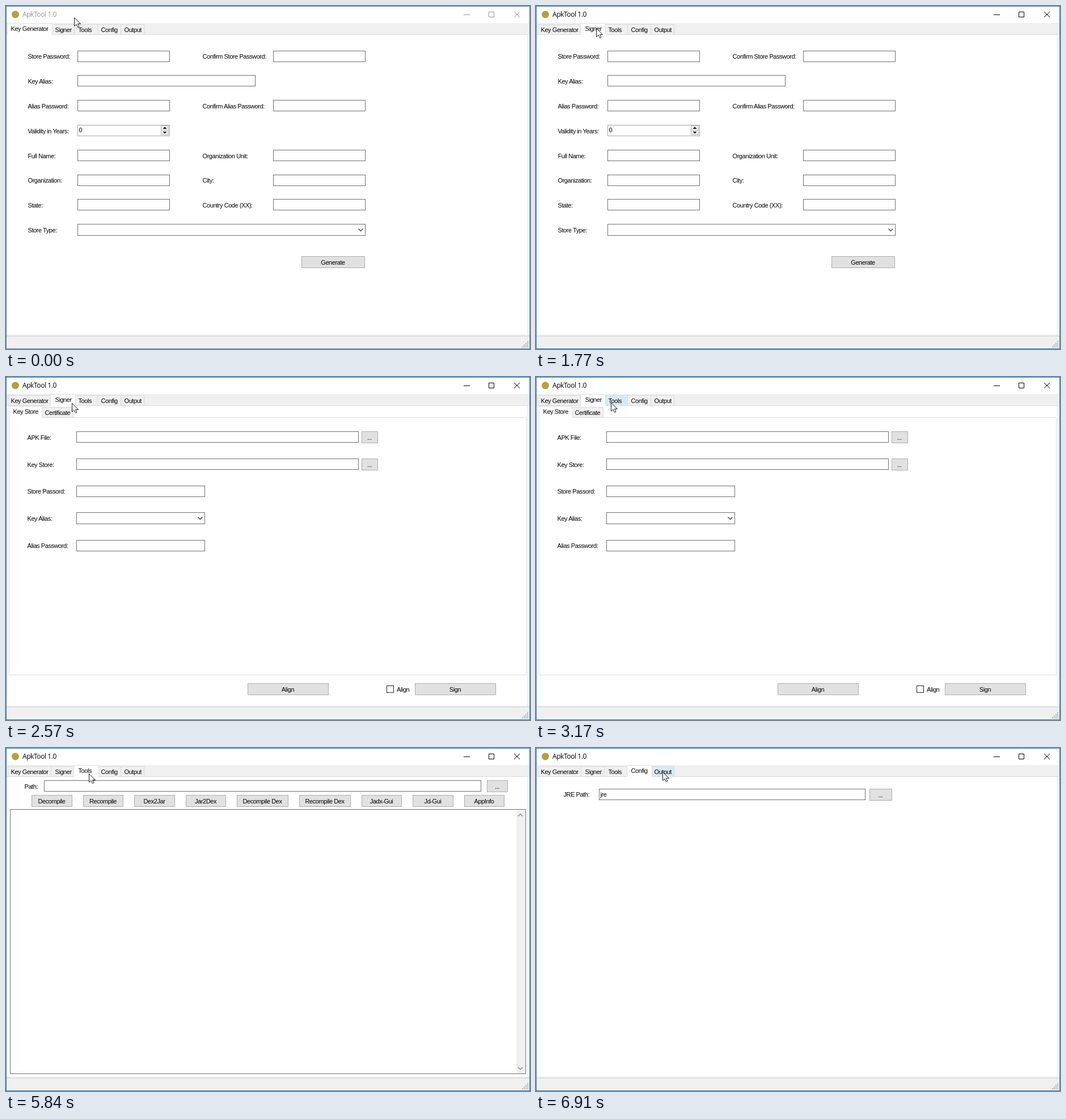
Animation of 924x606 px, one loop 8 s. Source, as an HTML page:

```html
<!DOCTYPE html>
<html lang="en">
<head>
<meta charset="utf-8">
<title>ApkTool</title>
<style>
html, body { margin: 0; width: 100%; height: 100%; overflow: hidden; background: #fff; }
svg { display: block; }
text { font: 11px "Liberation Sans", Arial, sans-serif; letter-spacing: -.43px; white-space: pre; }
.title { font: 12px "Open Sans", "Noto Sans", sans-serif; }
.mid { text-anchor: middle; }
</style>
</head>
<body>
<svg id="stage" width="924" height="606" viewBox="0 0 924 606"></svg>
<script>
const LOOP = 8000;
const stage = document.getElementById('stage');

// Drawing helpers; all return SVG markup.
const fill = (x, y, w, h, color) =>
  `<rect x="${x}" y="${y}" width="${w}" height="${h}" fill="${color}"/>`;
const box = (x, y, w, h, color = '#fff', line = '#707070') =>
  `<rect x="${x + .5}" y="${y + .5}" width="${w - 1}" height="${h - 1}" fill="${color}" stroke="${line}"/>`;
const path = (d, line, color = 'none', width = 1) =>
  `<path d="${d}" stroke="${line}" fill="${color}" stroke-width="${width}"/>`;
const text = (x, y, s, cls = '', color = '#000') =>
  `<text x="${x}" y="${y}" class="${cls}" fill="${color}">${s}</text>`;
const field = (x, y, w) => box(x, y, w, 20);
const button = (x, y, w, s) =>
  box(x, y, w, 21, '#e1e1e1', '#adadad') + text(x + w / 2 - .5, y + 15, s, 'mid');
const chevron = (x, y, dir, color) =>
  path(`M${x - 4} ${y - 2 * dir}l4 ${4 * dir}l4 ${-4 * dir}`, color, 'none', 1.4);
const combo = (x, y, w) => box(x, y, w, 21) + chevron(x + w - 8.5, y + 10.5, 1, '#444');

function keyPage() {
  const rows = [
    ['Store Password:', 'Confirm Store Password:'], ['Key Alias:'],
    ['Alias Password:', 'Confirm Alias Password:'], ['Validity in Years:'],
    ['Full Name:', 'Organization Unit:'], ['Organization:', 'City:'],
    ['State:', 'Country Code (XX):'], ['Store Type:']
  ];
  let out = '';
  rows.forEach(([left, right], i) => {
    const y = Math.floor(79 + 43.8 * i), base = Math.round(93.4 + 43.8 * i);
    out += text(38.5, base, left);
    if (i == 3) out += box(126, y, 163, 20, '#fff', '#a8a8a8');
    else out += i == 7 ? combo(126, y, 508) : field(126, y, i == 1 ? 314 : 163);
    if (right) out += text(346.5, base, right) + field(471, y, 163);
  });
  return out + text(128.5, 223, '0')
    + box(273, 211, 14, 9, '#f0f0f0', '#b4b4b4') + box(273, 219, 14, 9, '#f0f0f0', '#b4b4b4')
    + path('M276.5 217h7l-3.5-3.5zM276.5 222h7l-3.5 3.5z', 'none', '#000')
    + button(521, 442, 112, 'Generate');
}

function signPage(mouse) {
  let out = box(5, 71, 913, 456, '#fff', '#dcdcdc');
  const hot = inside(mouse, 65, 54, 119, 72);
  out += box(64, 53, 55, 19, hot ? '#d8eaf9' : '#f0f0f0', '#d9d9d9') + text(68.5, 67, 'Certificate');
  out += path('M5.5 72V51.5H64.5V72', '#dcdcdc', '#fff') + text(12.5, 65, 'Key Store');
  ['APK File:', 'Key Store:', 'Store Passord:', 'Key Alias:', 'Alias Password:'].forEach((s, i) => {
    const y = Math.round(96 + 47.9 * i);
    out += text(37.5, Math.round(110.7 + 47.8 * i), s);
    out += i == 3 ? combo(124, 239, 227) : field(124, y, i < 2 ? 498 : 227);
    if (i < 2) out += button(627, y, 29, '...');
  });
  return out + button(426, 541, 143, 'Align') + box(671, 545, 13, 13, '#fff', '#222')
    + text(689, 556, 'Align') + button(721, 541, 143, 'Sign');
}

function toolPage() {
  const names = ['Decompile', 'Recompile', 'Dex2Jar', 'Jar2Dex', 'Decompile Dex',
    'Recompile Dex', 'Jadx-Gui', 'Jd-Gui', 'AppInfo'];
  let x = 45.4, out = text(32.5, 72, 'Path:') + field(67, 57, 771) + button(848, 57, 37, '...');
  for (const name of names) {
    const w = name.includes(' ') ? 90.6 : 71.6, left = Math.floor(x);
    out += button(left, 83, Math.floor(x + w) - left, name);
    x += w + 19;
  }
  return out + box(7, 108, 910, 468) + fill(900, 109, 16, 466, '#f0f0f0')
    + chevron(907, 118.5, -1, '#858585') + chevron(907, 566, 1, '#858585');
}

const configPage = () => text(48.5, 86, 'JRE Path:') + field(111, 72, 470)
  + text(113.5, 86, 'jre') + button(588, 72, 40, '...');

const pages = [keyPage, signPage, toolPage, configPage];
const tabs = [['Key Generator', 4, 80, 8.5], ['Signer', 80, 121, 86.5], ['Tools', 121, 162, 127.5],
  ['Config', 162, 203, 167.5], ['Output', 203, 244, 208.5]];

const inside = ([x, y], l, t, r, b) => x >= l && x < r && y >= t && y < b;

function tabBar(active, mouse) {
  let out = fill(1, 30, 922, 21, '#f0f0f0') + fill(2, 50, 919, 1, '#dcdcdc');
  tabs.forEach(([name, l, r, x], i) => {
    if (i == active) return;
    const hot = inside(mouse, l, 32, r, 50);
    out += box(l - 1, 32, r - l + 1, 19, hot ? '#d8eaf9' : '#f0f0f0', '#d9d9d9') + text(x, 46, name);
  });
  const [name, l, r, x] = tabs[active];
  return out + path(`M${l - 1.5} 51V30.5H${r + 1.5}V51`, '#dcdcdc', '#fff') + text(x, 44, name);
}

function frame(on) {
  const ink = on ? '#000' : '#999', edge = on ? '#0f80c8' : '#3a87a8';
  let out = box(0, 0, 924, 606, '#fff', edge)
    + '<circle cx="16.5" cy="15" r="6.5" fill="#b3a23c"/>'
    + text(29, 19, 'ApkTool 1.0', 'title', on ? '#000' : '#8f9a92')
    + path('M807 15.5h11M851.5 10.5h9v9h-9zM896 10l10 10m0-10l-10 10', ink)
    + fill(920, 50, 1, 532, '#dcdcdc') + fill(1, 581, 922, 24, '#f0f0f0')
    + fill(1, 581, 922, 1, '#e2e2e2') + fill(1, 583, 922, 1, '#d7d7d7');
  for (let r = 0; r < 4; r++)
    for (let c = 3 - r; c < 4; c++) out += fill(910 + c * 3, 592 + r * 3, 2, 2, '#b4b4b4');
  return out;
}

// Pointer moves: start, end, number of steps, destination.
const moves = [
  [500, 1100, 8, 106, 34], [1240, 1440, 4, 106, 39], [2110, 2240, 3, 117, 41],
  [2570, 2770, 4, 112, 59], [2970, 3170, 4, 132, 45], [5840, 5840, 1, 146, 45],
  [5920, 6330, 6, 176, 42], [6710, 6910, 4, 223, 42]
];

function pointer(t) {
  let x = 120, y = 20;
  for (const [start, end, steps, toX, toY] of moves) {
    if (t < start) break;
    const step = t >= end ? steps : 1 + Math.floor((t - start) / (end - start) * (steps - 1));
    x += (toX - x) * step / steps;
    y += (toY - y) * step / steps;
  }
  return [Math.round(x), Math.round(y)];
}

// Clicks select a tab; its page is painted slightly later.
const clicks = [1770, 3510, 6450];
const selected = t => clicks.filter(c => t >= c).length;

function scene(t) {
  const mouse = pointer(t);
  return frame(t >= 500) + tabBar(selected(t), mouse) + pages[selected(t - 65)](mouse)
    + `<g transform="translate(${mouse})">`
    + path('M.5 .5V15.5L4 12.5L6.5 17.5L9 16.5L6.5 11.5H11.5Z', '#1a1a24', '#fff') + '</g>';
}

let last = '';
function tick() {
  const next = scene(performance.now() % LOOP);
  if (next !== last) stage.innerHTML = last = next;
  requestAnimationFrame(tick);
}
tick();
</script>
</body>
</html>
```
